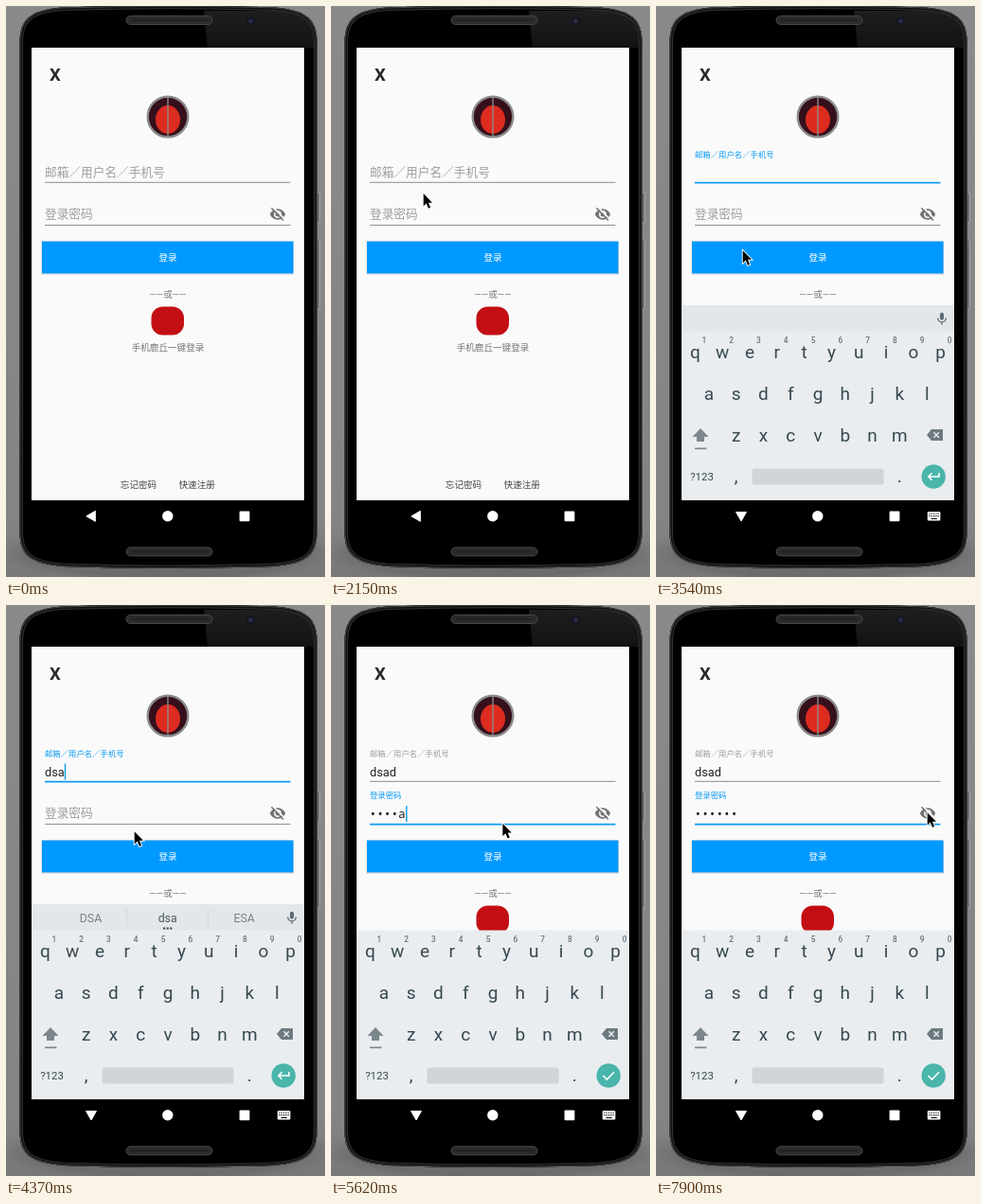
Recreate the animation shown at these times as an HTML page. Size 337 px wide and 603 px high, loop 8000 ms.

```html
<!DOCTYPE html>
<html lang="zh">
<head>
<meta charset="utf-8">
<title>登录</title>
<style>
html, body { margin: 0; width: 100%; height: 100%; overflow: hidden; background: #868686; }
svg { display: block; width: 337px; height: 603px; }
text { font-family: Roboto, "Noto Sans CJK SC", "Noto Sans CJK", sans-serif; white-space: pre; }
.mid { text-anchor: middle; }
.mono { font-family: "Noto Sans Mono", "DejaVu Sans Mono", monospace; }
</style>
</head>
<body>
<svg viewBox="0 0 337 603">
  <defs>
    <clipPath id="screen"><rect x="27" y="44" width="288" height="478"/></clipPath>
    <path id="shell" d="M14.5 38C14.5 14 26 4 60 1.5Q171-2 283 1.5C317 4 328.5 14 328.5 38V556C328.5 580 317 589 283 592Q171 596 60 592C26 589 14.5 580 14.5 556Z"/>
    <clipPath id="body"><use href="#shell"/></clipPath>
    <linearGradient id="wall" x2="0" y2="1">
      <stop offset="0" stop-color="#8a8a8a"/><stop offset=".9" stop-color="#848484"/>
      <stop offset="1" stop-color="#787878"/>
    </linearGradient>
    <linearGradient id="sheen" x2="0" y2="1">
      <stop offset="0" stop-color="#1e1e1e"/><stop offset="1" stop-color="#131313"/>
    </linearGradient>
    <radialGradient id="shade">
      <stop offset=".8" stop-color="#555" stop-opacity=".35"/><stop offset="1" stop-color="#666" stop-opacity="0"/>
    </radialGradient>
  </defs>

  <!-- phone -->
  <rect width="337" height="603" fill="url(#wall)"/>
  <ellipse cx="170" cy="578" rx="185" ry="32" fill="url(#shade)"/>
  <g fill="#6f6f6f" stroke="#b4b4b4" stroke-width=".7">
    <rect x="328" y="197" width="3.5" height="32" rx="1"/>
    <rect x="328" y="247" width="3.5" height="73" rx="1"/>
  </g>
  <use href="#shell" fill="#000"/>
  <g clip-path="url(#body)" fill="none">
    <path d="M209 5H330V44H213Z" fill="url(#sheen)"/>
    <use href="#shell" stroke="#333" stroke-width="7"/>
    <use href="#shell" stroke="#101010" stroke-width="5"/>
    <use href="#shell" stroke="#444" stroke-width="2"/>
  </g>
  <g fill="#2b2b2b" stroke="#484848">
    <rect x="127" y="10.5" width="91" height="9" rx="4.5"/>
    <rect x="127" y="571.8" width="91" height="9" rx="4.5"/>
  </g>
  <path d="M132 15H213M132 576.3H213" stroke="#222" stroke-width="2"/>
  <circle cx="258.5" cy="16" r="4.8" fill="#15161f"/>
  <circle cx="258.5" cy="16" r="2.3" fill="#2b2d4c"/>

  <!-- login page -->
  <g clip-path="url(#screen)">
    <rect x="27" y="44" width="288" height="478" fill="#fafafa"/>
    <text class="mid" x="52" y="78.5" font-size="18.5" font-weight="700" fill="#2a2a2a">X</text>
    <circle cx="171" cy="117" r="21.3" fill="#35101a" stroke="#8b8b8b" stroke-width="2.4"/>
    <ellipse cx="171" cy="120" rx="13" ry="15" fill="#dd2b20"/>
    <path d="M171 97V137" stroke="#8b8b8b" stroke-width="1.4"/>

    <path id="userLine"/>
    <path id="passLine"/>
    <text id="userLabel" x="41">邮箱／用户名／手机号</text>
    <text id="passLabel" x="41">登录密码</text>
    <text id="user" x="41" y="180.8" font-size="12.8" fill="#222"></text>
    <text id="pass" class="mono" x="40.6" y="224.8" font-size="12.7" fill="#222"></text>
    <rect id="userCaret" y="167.5" width="1.4" height="17" fill="#0d9bf0"/>
    <rect id="passCaret" y="212" width="1.4" height="17" fill="#0d9bf0"/>

    <g transform="translate(287 220)" fill="#737373">
      <path d="M-8.2 0C-5-7.6 5-7.6 8.2 0C5 7.6-5 7.6-8.2 0Z"/>
      <circle r="3.9" fill="#fafafa"/><circle r="2.4"/>
      <g id="slash" fill="none">
        <path d="M-5.2-7.6L7.4 5" stroke="#fafafa" stroke-width="1.7"/>
        <path d="M-6.6-6.8L6 6.4" stroke="#737373" stroke-width="1.5"/>
      </g>
    </g>

    <rect x="37.5" y="248.3" width="266.5" height="35.2" fill="#c3cbd3"/>
    <rect x="38" y="248.6" width="265.5" height="33.7" fill="#09f"/>
    <g class="mid" font-size="9.6">
      <text x="171" y="269" fill="#fff">登录</text>
      <text x="171" y="307.8" fill="#777">——或——</text>
      <text x="171" y="364" fill="#777">手机鹿丘一键登录</text>
      <text x="140" y="508.7" fill="#444">忘记密码</text>
      <text x="201.7" y="508.7" fill="#444">快速注册</text>
    </g>
    <rect x="153.5" y="317.5" width="34.5" height="30" rx="12" fill="#c30f14"/>

    <g id="board">
      <g id="strip">
        <rect x="27" y="316" width="288" height="28" fill="#e3e7e9"/>
        <g id="hints" class="mid" font-size="12.4" fill="#78848b">
          <path d="M127.5 321V340M213.5 321V340" stroke="#d3d8da"/>
          <text x="89.5" y="335"></text>
          <text x="170.7" y="335" fill="#4b5a62"></text>
          <text x="251.7" y="335"></text>
          <path d="M166 341.5H175.5" stroke="#37474f" stroke-width="2" stroke-dasharray="2.2 1.4"/>
        </g>
        <g stroke="#5c6a72" fill="none" stroke-width="1.3">
          <rect x="300.6" y="324.5" width="2.8" height="6.5" rx="1.4" fill="#5c6a72"/>
          <path d="M297.7 329.5a4.3 4.3 0 0 0 8.6 0M302 334V336.8"/>
        </g>
      </g>
      <rect x="27" y="343.5" width="288" height="179" fill="#e9edf0"/>
      <g id="keys" class="mid" fill="#37474f"></g>
      <path d="M47 446L55.5 455H51V460H43V455H38.5Z" fill="#7c878c"/>
      <rect x="41" y="466.5" width="12.5" height="1.7" fill="#7c878c"/>
      <path d="M286 453L291 447H303V459H291Z" fill="#6d797f"/>
      <path d="M293.5 450.3l5.4 5.4m0-5.4l-5.4 5.4" stroke="#e9edf0" stroke-width="1.4"/>
      <rect x="101.5" y="488.5" width="139" height="17" rx="2.5" fill="#d0d5d8"/>
      <circle cx="293.2" cy="497" r="12.7" fill="#4ab5aa"/>
      <path id="enter" fill="none" stroke="#fff" stroke-width="1.6"/>
    </g>
  </g>

  <!-- navigation bar -->
  <g fill="#fff">
    <path id="back" d="M-5.2 0L4.4-5.5V5.5Z" stroke="#fff" stroke-width=".9" stroke-linejoin="round"/>
    <circle cx="170.8" cy="538.8" r="5.7"/>
    <rect x="246.6" y="533.6" width="10.8" height="10.6" rx="1"/>
    <g id="boardIcon">
      <rect x="286.8" y="534" width="13.6" height="9.4" rx="1.2"/>
      <path d="M288.4 536.2H299M288.4 538.6H299" stroke="#000" stroke-width="1.1" stroke-dasharray="1.2 1.1"/>
      <path d="M290.5 541.4H296.8" stroke="#000" stroke-width="1.1"/>
    </g>
  </g>

  <g id="mouse">
    <path d="M.7 1.2V14.4L3.7 11.6L6 16.8L8.1 15.9L6 10.8H10Z" fill="#000" stroke="#fff" stroke-width="1.8" paint-order="stroke"/>
  </g>
</svg>
<script>
const LOOP = 8000;
const $ = id => document.getElementById(id);
const clamp = x => Math.max(0, Math.min(1, x));
const part = (t, a, b) => clamp((t - a) / (b - a));
const mix = (a, b, k) => a + (b - a) * k;
const show = (id, on) => $(id).setAttribute('visibility', on ? 'inherit' : 'hidden');
const set = (id, attrs) => { for (const k in attrs) $(id).setAttribute(k, attrs[k]); };
const within = (t, spans) => spans.some(([a, b]) => t >= a && t < b);
const latest = (t, rows) => rows.filter(r => t >= r[0]).pop();

const GREY = [158, 158, 158], BLUE = [13, 155, 245];
const blend = k => `rgb(${GREY.map((g, i) => Math.round(mix(g, BLUE[i], k)))})`;

// time, x, y of the pointer tip
const PATH = [
  [600, 8, 283], [820, 70, 246], [1000, 132, 198], [1270, 116, 168], [1470, 116, 168],
  [1680, 104, 233], [2030, 104, 233], [2150, 97, 197], [2350, 94, 163], [2550, 92, 173],
  [2950, 92, 173], [3220, 93, 192], [3310, 93, 192], [3450, 91, 256], [3530, 91, 256],
  [3540, 91, 257], [3710, 91, 257], [4000, 140, 343], [4360, 135, 238], [4430, 135, 238],
  [4630, 118, 205], [4920, 118, 205], [5040, 115, 207], [5300, 118, 212], [5720, 200, 235],
  [6150, 289, 220], [6600, 289, 220], [6870, 287, 221], [7420, 287, 221], [7530, 286, 218], [LOOP, 286, 218]
];
const USER = [[0, ''], [3800, 'd'], [4050, 'ds'], [4300, 'dsa'], [4480, 'dsad']];
const HINTS = [[0, ''], [3820, 'D d do'], [4080, 'DS ds DSA'], [4330, 'DSA dsa ESA'], [4560, 'dead dsad read']];
const SECRET = 'dsadas', PASS_START = 5250, PASS_STEP = 88;
const USER_CARET = [[2760, 3260], [3760, 4780]];
const PASS_CARET = [[4780, 6190], [6600, 7040], [7420, 7900]];

function buildKeys() {
  const key = (s, x, y, size) => `<text x="${x}" y="${y}" font-size="${size}">${s}</text>`;
  const row = (s, x, y) => [...s].map((c, i) => key(c, x + i * 28.8, y, 19)).join('');
  const digits = [...'1234567890'].map((c, i) => key(c, 50.8 + i * 28.8, 356, 8.3)).join('');
  $('keys').innerHTML = row('qwertyuiop', 41.4, 371.5) + row('asdfghjkl', 55.8, 415.5) +
    row('zxcvbnm', 84.6, 460) + `<g fill="#66747b" font-weight="500">${digits}</g>` +
    key('?123', 48.5, 501, 11.4) + key(',', 84.5, 503, 19) + key('.', 257.3, 503, 19);
}

function pointer(t) {
  const i = PATH.findIndex(p => p[0] > t);
  const a = PATH[i - 1] || PATH[0], b = i < 0 ? a : PATH[i];
  const k = part(t, a[0], b[0]);
  return [mix(a[1], b[1], k), mix(a[2], b[2], k)];
}

function field(name, base, line, k, tint, focused) {
  set(name + 'Label', {
    y: mix(base, base - 19.9, k ** 3),
    'font-size': mix(12.7, 8.4, k),
    fill: blend(tint)
  });
  set(name + 'Line', {
    d: `M41 ${line + (focused ? .3 : 0)}H300.5`,
    stroke: focused ? blend(1) : '#8c8c8c',
    'stroke-width': focused ? 1.7 : 1
  });
}

function password(t) {
  const n = Math.min(SECRET.length, Math.floor((t - PASS_START) / PASS_STEP) + 1);
  if (n <= 0) return '';
  if (t >= 6600 && t < 7420) return SECRET;
  return t < 6600 ? '•'.repeat(n - 1) + SECRET[n - 1] : '•'.repeat(n);
}

function draw(t) {
  const userUp = part(t, 2760, 3000), passUp = part(t, 4920, 5160);
  const userOn = t >= 2760 && t < 4920;
  field('user', 180.2, 186.3, userUp, userOn ? userUp : 0, userOn);
  field('pass', 224.2, 231.4, passUp, passUp, t >= 4780);

  const name = latest(t, USER)[1], code = password(t);
  $('user').textContent = name;
  $('pass').textContent = code;
  $('userCaret').setAttribute('x', 41 + (name ? $('user').getComputedTextLength() : 0));
  $('passCaret').setAttribute('x', 41 + code.length * 7.62);
  show('userCaret', within(t, USER_CARET));
  show('passCaret', within(t, PASS_CARET));
  show('slash', !(t >= 6600 && t < 7420));

  const rise = part(t, 3300, 3450);
  show('board', rise > 0);
  set('board', { transform: `translate(0 ${(1 - rise) ** 2 * 45})`, opacity: rise });
  show('strip', t < 5200);
  const words = latest(t, HINTS)[1];
  show('hints', words && t < 5200);
  document.querySelectorAll('#hints text').forEach((el, i) => el.textContent = words.split(' ')[i] || '');
  $('enter').setAttribute('d', t < 5200
    ? 'M299 493V497H288M291.5 493.3L287.8 497L291.5 500.7'
    : 'M287.5 497L291.5 501L299 493.2');

  set('back', { transform: `translate(90 538.8) rotate(${-90 * part(t, 3080, 3200)})` });
  show('boardIcon', t >= 3150);

  show('mouse', t >= 600);
  set('mouse', { transform: `translate(${pointer(t)})` });
}

buildKeys();
const start = performance.now();
function tick() {
  draw((performance.now() - start) % LOOP);
  requestAnimationFrame(tick);
}
draw(0);
requestAnimationFrame(tick);
</script>
</body>
</html>
```
